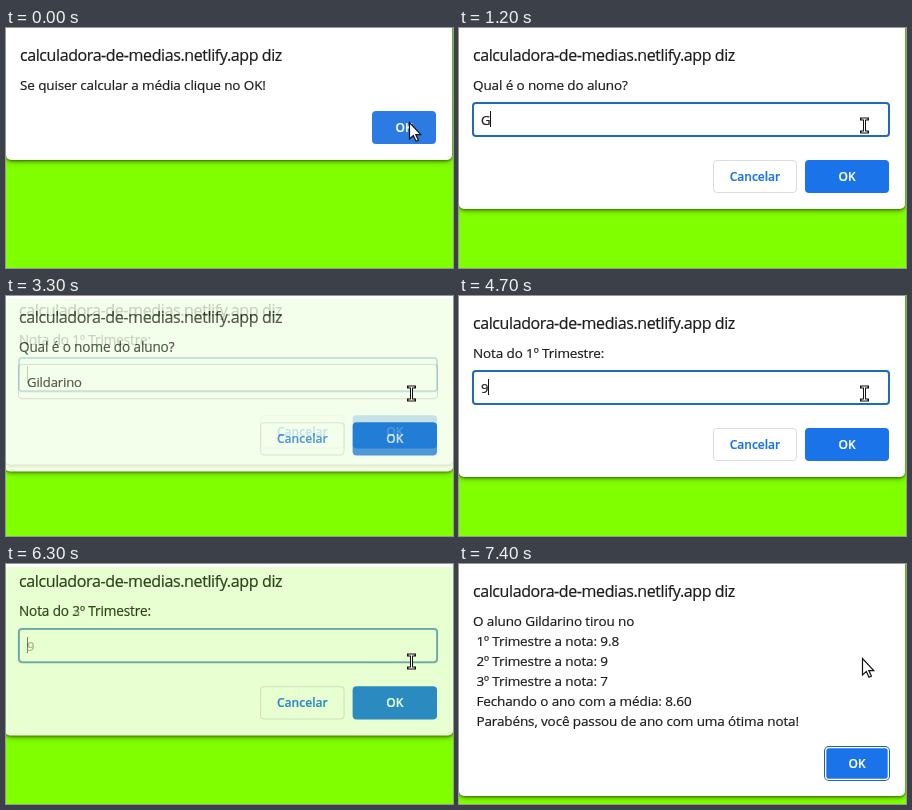
An HTML page for the animation above (8000 ms loop, 447 by 240 pixels).

```html
<!DOCTYPE html>
<html lang="pt-BR">
<head>
<meta charset="utf-8">
<title>Calculadora de médias</title>
<style>
  html, body { margin: 0; width: 100%; height: 100%; overflow: hidden; background: #80ff00; }
  body {
    position: relative; color: #1b1c1e;
    font: 13.5px/20px "Open Sans", "Noto Sans", sans-serif;
    letter-spacing: -.12px; -webkit-text-stroke: .2px;
  }
  .dialog {
    position: absolute; left: 0; top: -20px; width: 446px; background: #fff;
    border-radius: 0 0 5px 5px;
    box-shadow: 0 1px 3px rgba(0,0,0,.5), 0 2px 6px rgba(0,0,0,.25);
  }
  .dialog > * { position: absolute; box-sizing: border-box; white-space: pre; }
  .title { left: 14px; top: 37px; font-size: 16px; letter-spacing: -.4px; }
  .message { left: 14px; top: 67px; }
  .field {
    left: 13px; top: 94px; width: 418px; height: 35px; padding-left: 7px;
    display: flex; align-items: center; font-size: 13px;
    border: 2px solid #1d6bb9; border-radius: 4px;
  }
  .idle .field { border: 1px solid #d3d6da; padding-left: 8px; }
  .caret { width: 1px; height: 16px; margin-top: -1px; background: #111; }
  .idle .caret { visibility: hidden; }
  .button {
    height: 33px; border-radius: 4px; text-align: center;
    font-size: 12px; font-weight: 600; line-height: 33px; letter-spacing: 0;
  }
  .ok { right: 16px; width: 84px; background: #1a73e8; color: #fff; }
  .alert .ok { width: 64px; }
  .hover .ok { background: #2b7be2; }
  .ring .ok { box-shadow: 0 0 0 1px #1d62bd, inset 0 0 0 1.3px #fff; }
  .cancel { left: 254px; width: 84px; line-height: 31px; border: 1px solid #dadce0; color: #1a73e8; }
  .edge { position: absolute; left: 0; top: 0; width: 446px; height: 3px; background: #fff; }
  svg { position: absolute; left: 0; top: 0; }
</style>
</head>
<body>
<script>
const LOOP = 8000;
const SITE = 'calculadora-de-medias.netlify.app diz';
const STUDENT = 'Gildarino';

// Typed text: [time, number of characters]
const windows = [
  { kind: 'alert hover', height: 132, text: 'Se quiser calcular a média clique no OK!' },
  { height: 181, text: 'Qual é o nome do aluno?', value: STUDENT,
    keys: [[1200, 1], [1500, 2], [1600, 3], [2000, 4], [2300, 5], [2400, 7], [2500, 8], [2700, 9]] },
  { height: 181, text: 'Nota do 1º Trimestre:', value: '9.8', keys: [[3700, 1], [4800, 2], [5200, 3]] },
  { height: 181, text: 'Nota do 2º Trimestre:', value: '9', keys: [[5900, 1]] },
  { height: 181, text: 'Nota do 3º Trimestre:', value: '7', keys: [[7000, 1]] },
  { kind: 'alert ring', height: 232, text: [
    `O aluno ${STUDENT} tirou no`,
    ' 1º Trimestre a nota: 9.8',
    ' 2º Trimestre a nota: 9',
    ' 3º Trimestre a nota: 7',
    ' Fechando o ano com a média: 8.60',
    ' Parabéns, você passou de ano com uma ótima nota!'].join('\n') },
];

// Each 100 ms step: leaving opacity and y, entering opacity and y
const slow = [[.97, -2, 0, -15], [.9, -6, .2, -13], [.4, -12, .75, -6]];
const medium = [[.9, -6, .2, -13], [.5, -11, .65, -8]];
const quick = [[.65, -10, .5, -10]];
const changes = [[100, slow], [3200, slow], [5400, medium], [6300, quick], [7300, quick]];
const caretOff = [[700, 1200], [4200, 4700], [6800, 7000]];

function add(parent, name, text = '') {
  const el = document.createElement('div');
  el.className = name;
  el.textContent = text;
  parent.append(el);
  return el;
}

for (const w of windows) {
  const d = w.el = add(document.body, 'dialog ' + (w.kind || ''));
  d.style.height = w.height + 20 + 'px';
  add(d, 'title', SITE);
  add(d, 'message', w.text);
  if (w.keys) {
    const field = add(d, 'field');
    w.typed = add(field, 'typed');
    w.caret = add(field, 'caret');
    add(d, 'button cancel', 'Cancelar').style.top = w.height - 29 + 'px';
  }
  add(d, 'button ok', 'OK').style.top = w.height - 29 + 'px';
}
add(document.body, 'edge');
document.body.insertAdjacentHTML('beforeend', `
  <svg width="447" height="240" fill="none">
    <path id="arrow" d="M403.5 94.5v16.5l3.8-3.5 2.7 5.8 2.4-1.1-2.6-5.6h5z" fill="#fff" stroke="#111" stroke-width="1.2"/>
    <g id="beam">
      <path d="M402.5 91h6M405.5 91v13M402.5 104h6" stroke="#111" stroke-width="3" stroke-linecap="square"/>
      <path d="M402.5 91h6M405.5 91v13M402.5 104h6" stroke="#fff"/>
    </g>
  </svg>`);
const arrow = document.getElementById('arrow');
const beam = document.getElementById('beam');

function pose(w, opacity, y, moving, idle) {
  w.el.style.display = opacity ? '' : 'none';
  w.el.style.opacity = opacity;
  w.el.style.transform = moving ? `translateY(${y}px) scale(1.005)` : 'none';
  w.el.classList.toggle('idle', idle);
}

function draw(t) {
  for (const w of windows) {
    pose(w, 0, 0, false, false);
    if (!w.keys) continue;
    const key = w.keys.filter(k => t >= k[0]).pop();
    w.typed.textContent = w.value.slice(0, key ? key[1] : 0);
    w.caret.style.opacity = caretOff.some(([a, b]) => t >= a && t < b) ? 0 : 1;
  }

  const done = changes.filter(c => t >= c[0]).length;
  const [start, steps] = changes[done - 1] || [0, []];
  const step = done && steps[Math.floor((t - start) / 100)];
  if (step) {
    pose(windows[done - 1], step[0], step[1], true, true);
    pose(windows[done], step[2], step[3], true, false);
  } else {
    pose(windows[done], 1, 0, false, false);
  }

  const typing = t >= 300 && t < 7200;
  arrow.style.display = typing ? 'none' : '';
  beam.style.display = typing ? '' : 'none';
}

const begin = performance.now();
function frame() {
  draw((performance.now() - begin) % LOOP);
  requestAnimationFrame(frame);
}
frame();
</script>
</body>
</html>
```
